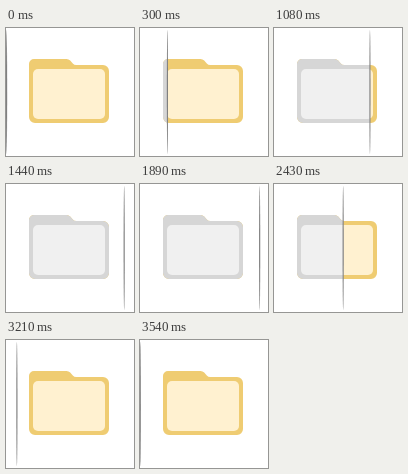
Write an HTML page with a canvas that moves like this. It is 128 px wide and 128 px high and loops after 3.6 s.

```html
<!DOCTYPE html>
<html lang="en">
<head>
<meta charset="utf-8">
<title>Folder wipe</title>
<style>
  html, body { margin: 0; width: 100%; height: 100%; overflow: hidden; background: #fff; }
  canvas { display: block; width: 128px; height: 128px; }
</style>
</head>
<body>
<canvas id="stage" width="128" height="128"></canvas>
<script>
const SIZE = 128;
const SWEEP = 1800;
const LEAD = 8;
const REACH = 127.6;
const GRAY = { shell: '#d6d6d6', sheet: '#f0f0f0' };
const YELLOW = { shell: '#efcc72', sheet: '#fff1d0' };

const ctx = document.getElementById('stage').getContext('2d');

const shell = new Path2D(
  'M23 36a5 5 0 0 1 5-5H60.5q2.2 0 3.7 1.6L66.8 35.5q1.4 1.5 3.4 1.5H97' +
  'a6 6 0 0 1 6 6V89a6 6 0 0 1-6 6H29a6 6 0 0 1-6-6Z');
const sheet = new Path2D();
sheet.roundRect(27, 41, 72, 50, 5);

const bezier = (a, b, v) => 3 * a * v * (1 - v) ** 2 + 3 * b * v * v * (1 - v) + v ** 3;

// Linear departure, soft arrival: cubic-bezier(.167, .167, .667, 1)
function ease(u) {
  let low = 0, high = 1;
  for (let i = 0; i < 24; i++) {
    const mid = (low + high) / 2;
    if (bezier(0.167, 0.667, mid) < u) low = mid; else high = mid;
  }
  return bezier(0.167, 1, low);
}

function lineX(time) {
  const t = (time + LEAD) % (2 * SWEEP);
  const progress = ease((t % SWEEP) / SWEEP);
  return REACH * (t < SWEEP ? progress : 1 - progress);
}

function drawFolder(colors, left, right) {
  ctx.save();
  ctx.beginPath();
  ctx.rect(left, 0, right - left, SIZE);
  ctx.clip();
  ctx.fillStyle = colors.shell;
  ctx.fill(shell);
  ctx.fillStyle = colors.sheet;
  ctx.fill(sheet);
  ctx.restore();
}

function draw(time) {
  const x = lineX(time);
  ctx.fillStyle = '#fff';
  ctx.fillRect(0, 0, SIZE, SIZE);
  drawFolder(YELLOW, 0, SIZE);
  drawFolder(GRAY, 0, x);
  ctx.fillStyle = '#808080';
  ctx.beginPath();
  ctx.ellipse(x, 64, 0.6, 62, 0, 0, 2 * Math.PI);
  ctx.fill();
}

const start = performance.now();
function tick() {
  const elapsed = performance.now() - start;
  draw(Math.floor(elapsed / 30) * 30 % (2 * SWEEP));
  requestAnimationFrame(tick);
}
tick();
</script>
</body>
</html>
```
